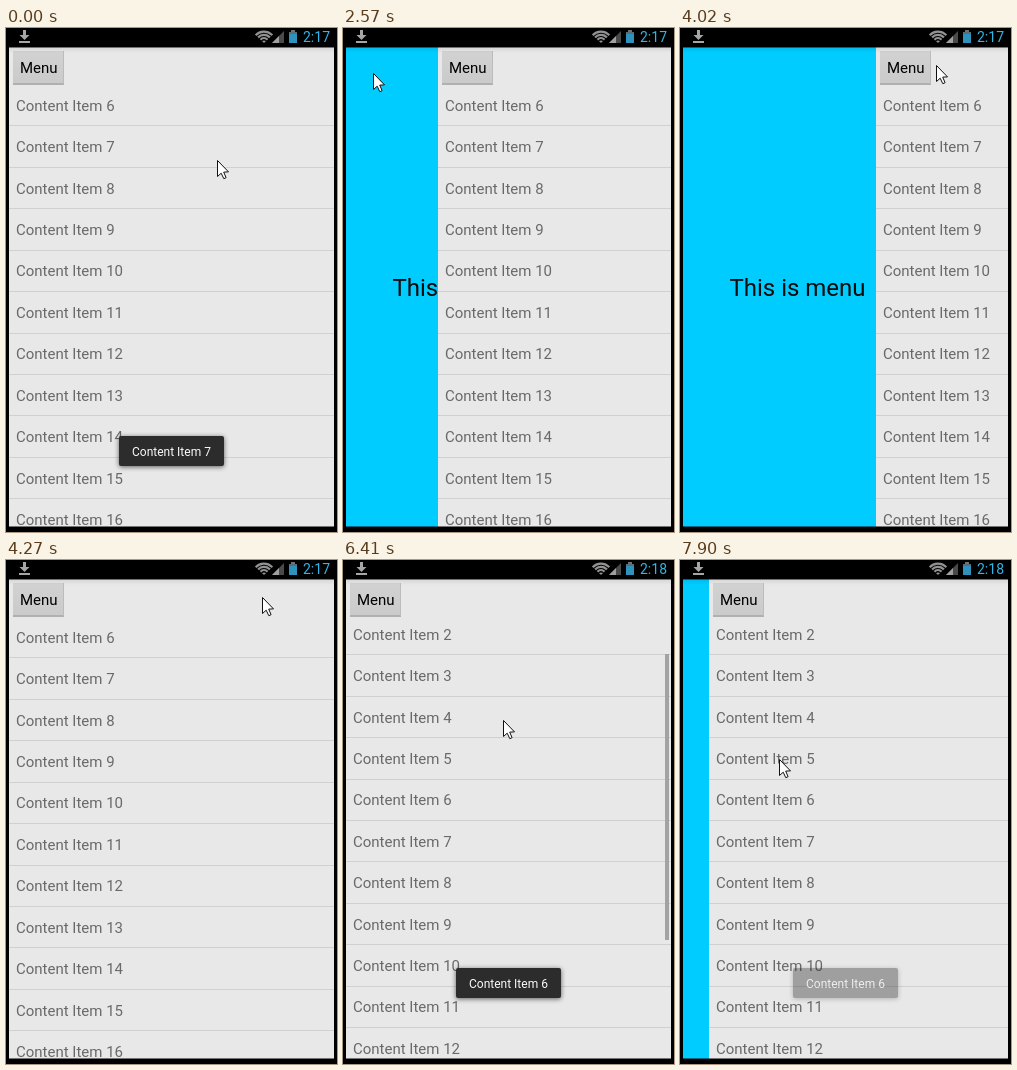
Recreate the animation shown at these times as an HTML page with a canvas. Size 331 by 504 pixels, loop 8 s.

```html
<!DOCTYPE html>
<html lang="en">
<head>
<meta charset="utf-8">
<title>Sliding menu</title>
<style>
  html, body { margin: 0; width: 100%; height: 100%; overflow: hidden; background: #000; }
  canvas { display: block; width: 331px; height: 504px; }
</style>
</head>
<body>
<canvas id="stage" width="331" height="504"></canvas>
<script>
let ctx = document.getElementById('stage').getContext('2d');
const LOOP = 8000;
const STEP = 133;
const FONT = 'Roboto, "Open Sans", sans-serif';
const VIEW = { x: 3, y: 19, w: 325, h: 480 };
const ROW = 41.42;
const MENU_W = 229;
const SCROLLED = 162.6;
const BLUE = '#33b5e5';

// Each move: start, duration, then the values it eases to.
const pointer = [
  [270, 240, 198, 156],
  [1500, 600, 30, 45],
  [2700, 380, 170, 47],
  [3080, 620, 256, 37],
  [4400, 270, 190, 114],
  [4670, 620, 144, 72],
  [5900, 510, 160, 160],
  [6800, 700, 57, 204],
  [7750, 130, 99, 199]
];
const slide = [[2380, 430, MENU_W], [3950, 320, 0], [7750, 130, 26]];
const scroll = [[5950, 450, SCROLLED]];
const barFade = [[5950, 100, 1], [6560, 400, 0]];
const toastFade = [[1180, 520, 0], [5690, 150, 1], [7580, 530, 0]];

const clamp = v => Math.min(1, Math.max(0, v));
const ease = p => p * p * (3 - 2 * p);

function tween(from, moves, t) {
  return moves.reduce((pos, [start, span, ...to]) => {
    const k = ease(clamp((t - start) / span));
    return pos.map((v, i) => v + (to[i] - v) * k);
  }, from);
}

function rect(x, y, w, h, fill) {
  ctx.fillStyle = fill;
  ctx.fillRect(x, y, w, h);
}

function fade(y, h, from, to) {
  const shade = ctx.createLinearGradient(0, y, 0, y + h);
  shade.addColorStop(0, from);
  shade.addColorStop(1, to);
  return shade;
}

function text(str, x, y, size, fill, align = 'left') {
  ctx.font = size + 'px ' + FONT;
  ctx.textAlign = align;
  ctx.fillStyle = fill;
  ctx.fillText(str, x, y);
}

function poly(points, fill) {
  ctx.beginPath();
  points.forEach(([x, y]) => ctx.lineTo(x, y));
  ctx.closePath();
  ctx.fillStyle = fill;
  ctx.fill();
}

function clip(x, y, w, h) {
  ctx.beginPath();
  ctx.rect(x, y, w, h);
  ctx.clip();
}

function statusBar(t) {
  const grey = '#a6a6a6';
  rect(17, 2, 3, 6, grey);
  poly([[13.5, 7], [23.5, 7], [18.5, 12]], grey);
  rect(13, 13, 11, 2, grey);

  ctx.strokeStyle = '#929292';
  ctx.lineWidth = 2.2;
  for (let r = 1.5; r < 12; r += 3.3) {
    ctx.beginPath();
    ctx.arc(258, 15, r, -Math.PI * 0.76, -Math.PI * 0.24);
    ctx.stroke();
  }

  poly([[266, 15], [278, 15], [278, 3]], '#4a4a4a');
  poly([[266, 15], [273, 15], [273, 8]], '#a0a0a0');

  rect(285, 2, 4, 2, '#707070');
  rect(283, 4, 8, 11, '#5b6c74');
  rect(283, 6, 8, 9, '#2d93bd');

  text(t < 5080 ? '2:17' : '2:18', 297, 14, 14, BLUE);
}

function menuPanel() {
  rect(VIEW.x, VIEW.y, MENU_W, VIEW.h, '#00ccff');
  text('This is menu', VIEW.x + MENU_W / 2, 268, 24, '#0b0b0b', 'center');
}

function button(pressed) {
  if (pressed) {
    rect(3, 19, 58, 41, 'rgba(51,181,229,.3)');
    rect(5, 21, 54, 37, 'rgba(51,181,229,.3)');
  }
  rect(7, 23, 51, 33, pressed ? fade(23, 33, '#a5d5e6', '#8fcbe2') : fade(23, 33, '#d2d2d2', '#cacaca'));
  rect(7, 55, 51, 2, '#b0b0b0');
  rect(57, 23, 1, 33, '#bcbcbc');
  text('Menu', 14, 45, 15, '#000');
}

function list(offset, barAlpha) {
  ctx.save();
  clip(VIEW.x, 60, VIEW.w, 439);
  for (let n = 1; n <= 17; n++) {
    const y = (n - 6) * ROW + offset;
    text('Content Item ' + n, 10, Math.floor(83.25 + y), 15, '#696969');
    rect(VIEW.x, Math.floor(97.9 + y), VIEW.w, 1, '#d0d0d0');
  }
  ctx.globalAlpha = barAlpha;
  rect(322, 94 + (SCROLLED - offset) * 0.65, 4, 286, '#a3a3a3');
  ctx.restore();
}

function content(t, dx) {
  const pressed = [2330, 3870].some(at => t >= at && t < at + STEP);
  ctx.save();
  ctx.translate(dx, 0);
  rect(VIEW.x, VIEW.y, VIEW.w, VIEW.h, '#e8e8e8');
  list(tween([0], scroll, t)[0], tween([0], barFade, t)[0]);
  button(pressed);
  ctx.restore();
}

function viewport(t) {
  const dx = Math.round(tween([0], slide, t)[0]);
  ctx.save();
  clip(VIEW.x, VIEW.y, VIEW.w, VIEW.h);
  if (dx > 0) menuPanel();
  content(t, dx);
  rect(VIEW.x, VIEW.y, VIEW.w, 1, 'rgba(0,0,0,.5)');
  rect(VIEW.x, VIEW.y + 1, VIEW.w, 5, fade(VIEW.y + 1, 5, 'rgba(0,0,0,.07)', 'rgba(0,0,0,0)'));
  rect(VIEW.x, VIEW.y + VIEW.h - 1, VIEW.w, 1, 'rgba(0,0,0,.5)');
  ctx.restore();
}

// Painted once off screen, so that box, shadow and label fade as one layer.
function makeToast(label) {
  const layer = document.createElement('canvas');
  layer.width = 125;
  layer.height = 50;
  const screen = ctx;
  ctx = layer.getContext('2d');
  ctx.shadowColor = 'rgba(0,0,0,.6)';
  ctx.shadowBlur = 5;
  ctx.shadowOffsetY = 1;
  ctx.beginPath();
  ctx.roundRect(10, 10, 105, 30, 2);
  ctx.fillStyle = '#2d2c2d';
  ctx.fill();
  ctx.shadowColor = 'transparent';
  text(label, 23, 30, 12, '#fafafa');
  ctx = screen;
  return layer;
}

const toasts = [7, 6].map(n => makeToast('Content Item ' + n));

function toast(t) {
  ctx.globalAlpha = tween([1], toastFade, t)[0];
  ctx.drawImage(toasts[t < LOOP / 2 ? 0 : 1], 103, 398);
  ctx.globalAlpha = 1;
}

function cursor(t) {
  const [x, y] = tween([211, 132], pointer, t).map(Math.round);
  ctx.save();
  ctx.translate(x + 0.5, y + 0.5);
  poly([[0, 0], [0, 16], [3.7, 12.7], [6.3, 18.2], [8.6, 17.2], [6.2, 11.6], [11, 11.4]], '#fff');
  ctx.strokeStyle = '#111';
  ctx.lineWidth = 1;
  ctx.stroke();
  ctx.restore();
}

function draw(now) {
  const tick = Math.floor((now % LOOP) / STEP - 0.1);
  const t = Math.max(0, (tick + 0.3) * STEP);
  rect(0, 0, 331, 504, '#000');
  statusBar(t);
  viewport(t);
  toast(t);
  cursor(t);
}

const start = performance.now();
function loop() {
  draw(performance.now() - start);
  requestAnimationFrame(loop);
}
loop();
</script>
</body>
</html>
```
